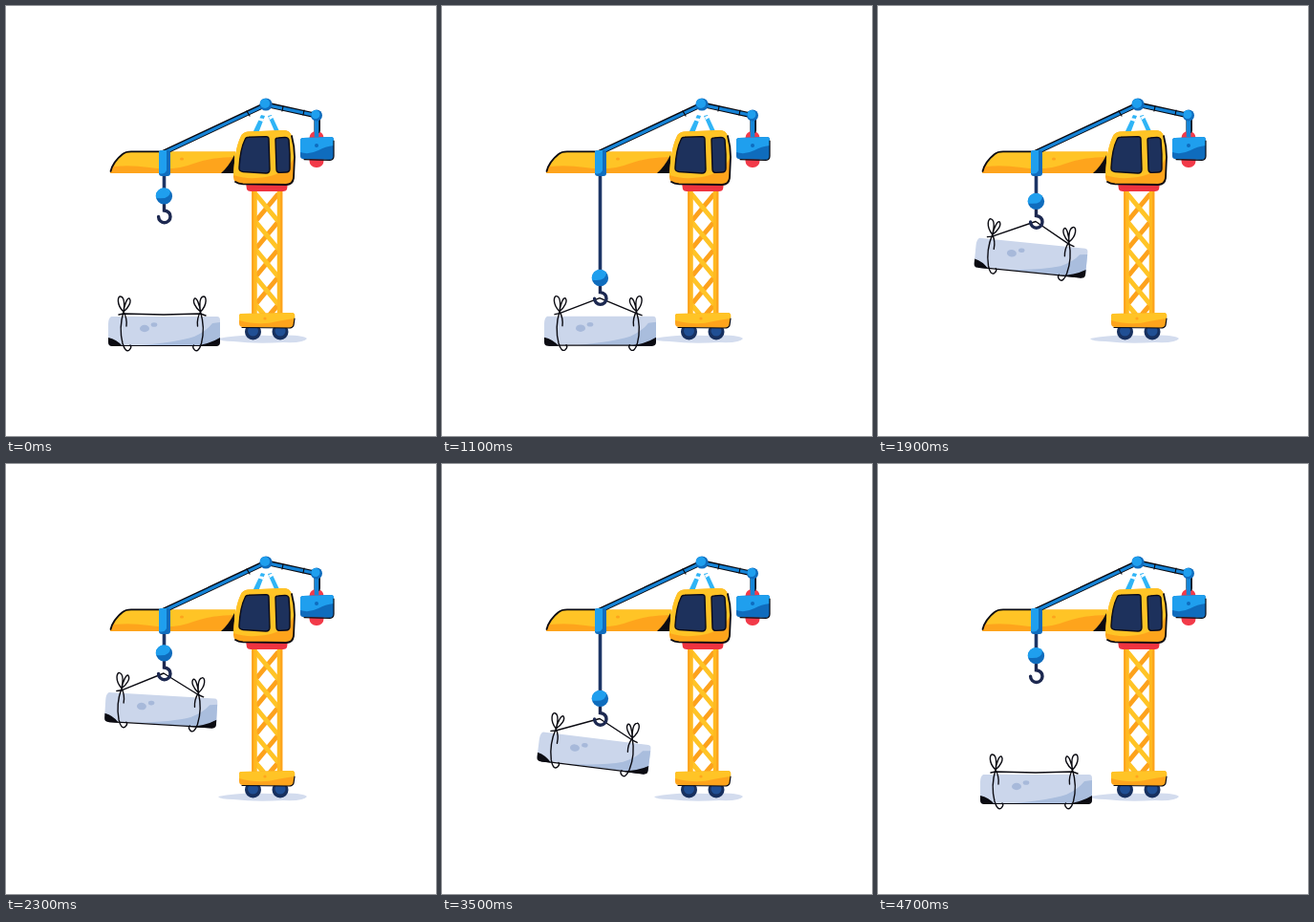
Animation, 450 px wide and 450 px high, one loop 4800 ms. Source, as an HTML page:

```html
<!DOCTYPE html>
<html lang="en">
<head>
<meta charset="utf-8">
<title>Tower crane</title>
<style>
html, body { margin: 0; width: 100%; height: 100%; overflow: hidden; background: #fff; }
svg { display: block; width: 100vw; height: 100vh; }
.line { fill: none; stroke: #0b0b12; stroke-linecap: round; stroke-linejoin: round; }
.sun { fill: #ffc426; }
.amber { fill: #fea41c; }
.sky { fill: #1f9fee; }
.sea { fill: #0f6cbd; }
.ink { fill: #0b0b12; }
</style>
</head>
<body>
<svg viewBox="0 0 450 450">
  <path fill="#d3dcee" d="M222 348Q246 343 276 345Q310 343 315 348Q312 353 290 352Q262 354 238 351Q224 351 222 348Z"/>

  <!-- tower -->
  <g fill="none" stroke-width="5">
    <path id="backBars" stroke="#fda21c"/>
    <path id="frontBars" stroke="#ffc426"/>
    <path stroke="#ffb920" stroke-width="5.5" d="M260 193V323M286.5 193V323"/>
    <path stroke="#fda21c" stroke-width="2" d="M258.2 194V322M288.3 194V322"/>
  </g>
  <path fill="#ef3340" d="M251 185H295L294 192Q293 194 290 194H256Q253 194 252 192Z"/>

  <!-- wheels and base -->
  <g id="wheels"></g>
  <path class="amber" d="M246 322L300 321Q303 322 302 326L301 334Q300 337 296 337L248 336Q244 336 244 332V325Q244 322 246 322Z"/>
  <path class="sun" d="M246 322L300 321Q303 322 302 327Q294 328 284 330Q266 335 244 329V325Q244 322 246 322Z"/>
  <path class="line" stroke-width="1.2" d="M247 336.5L296 337Q300 337 301 334L302 327"/>
  <circle class="amber" cx="271" cy="327" r="1.6"/>

  <!-- boom -->
  <path class="amber" d="M109 175Q112 163 122 155Q125 152.5 131 152.5H240V175Z"/>
  <path class="sun" d="M122 155Q125 152.5 131 152.5H240V158Q215 158 196 165Q176 173 150 169Q130 166 113 168Q116 160 122 155Z"/>
  <path class="ink" d="M225 175Q233 168 239 156V175Z"/>
  <path class="line" stroke-width="1.8" d="M109.5 173Q112 163 122 155Q125 152.3 131 152.3H160"/>
  <ellipse class="amber" cx="184" cy="160" rx="2" ry="1.5"/>

  <!-- cabin -->
  <path fill="#2fb4f6" d="M267 114L271 115L264.5 132H258.5ZM274 115L278 114L285.5 130L281 131Z"/>
  <path fill="#fff" d="M264 117L270 118L269 121L263 119ZM275 116L280 114L281 116L276 119Z"/>
  <path class="amber" d="M246 136Q248 132 253 131.5L291 130Q297 130 299 136Q302 147 302 158L301 180Q300 187 293 187L247 186Q238 186 238 179Q239 150 246 136Z"/>
  <path class="sun" d="M246 136Q248 132 253 131.5L291 130Q297 130 299 136Q301 144 302 157Q295 175 272 179Q252 182 238 177Q239 150 246 136Z"/>
  <path class="line" stroke-width="1.8" d="M240 184Q243 186 248 186.3L293 187Q300 187 301 180L302 158Q302 147 299 136"/>
  <g fill="#1d315c" stroke="#0b0b18" stroke-width="1.4" stroke-linejoin="round">
    <path d="M250 140Q251 137.3 254 137.3L272 136.6Q275 136.6 275 139L276 171Q276 175 272 175L248 173.5Q243.5 173 244 169Q245 150 250 140Z"/>
    <path d="M282 140Q282 138 285 138L292 137.4Q295 137.4 296 140Q297.5 155 297 170Q297 174 293 174L286 174.4Q283 174 283 171Z"/>
  </g>

  <!-- counterweight -->
  <rect x="317.5" y="131" width="15" height="38" rx="7" fill="#f23a49"/>
  <path class="line" stroke-width="6.5" d="M325.7 117V130"/>
  <path fill="none" stroke="#1585d8" stroke-width="4.6" d="M325 115V137"/>
  <path class="sea" d="M311 138L340 137Q343 137 343 140V157Q343 161 339 161L311 160Q308 160 308 157V141Q308 138 311 138Z"/>
  <path class="sky" d="M311 138L340 137Q343 137 343 140V146Q334 147 327 151Q317 156 308 153V141Q308 138 311 138Z"/>
  <path class="line" stroke-width="1.2" d="M312 160.6L339 161.4Q343 161 343 157V141"/>
  <circle class="sea" cx="325" cy="146" r="2"/>

  <!-- tie rods -->
  <path class="line" stroke-width="5.4" d="M164 153.8L272 103L326 115"/>
  <path fill="none" stroke="#1583d6" stroke-width="3.2" d="M164 154L272 103.4L325 114.6"/>
  <path class="line" stroke-width="1.2" d="M252 110L255 115M290 105L289 110M312 109L311 114"/>
  <g id="joints"></g>

  <!-- load -->
  <g id="load">
    <path fill="#cbd6eb" d="M110 325H221Q224 325 224 329V351Q224 355 220 355H111Q107 355 107 351V333Q107 327 110 325Z"/>
    <path fill="#a9bddd" d="M142 355Q178 352 197 346Q210 340 216 332L224 331V351Q224 355 220 355Z"/>
    <path class="ink" d="M107 347Q116 349 122 356H111Q107 356 107 352ZM195 356Q213 354 224 347V352Q224 356 220 356Z"/>
    <path class="line" stroke-width="1.2" d="M112 355.5H220"/>
    <ellipse cx="145" cy="337.5" rx="5" ry="3.7" fill="#a7b9da"/>
    <ellipse cx="155" cy="333.5" rx="3.3" ry="2.3" fill="#a7b9da"/>
    <path id="sling" class="line" stroke-width="1.4"/>
    <g id="ties" class="line" stroke-width="1.4"></g>
  </g>

  <!-- hoist -->
  <path id="rope" fill="none" stroke="#1c3566" stroke-width="3.6"/>
  <g id="hook">
    <path fill="none" stroke="#1c2850" stroke-width="3.4" stroke-linecap="round" d="M165.5 8V15Q172 16 172 21.5A6.2 6.2 0 0 1 159.6 21.5"/>
    <circle class="sea" cx="165.5" r="8.6"/>
    <path class="sky" d="M157 2A8.6 8.6 0 0 1 172 -5.6Q172 4 157 2Z"/>
  </g>
  <path class="sea" d="M160 153Q160 151 163 151H169Q172 151 172 154V175Q172 178 169 178H163Q160 178 160 175Z"/>
  <path class="sky" d="M160 153Q160 151 163 151H168V172Q166 177 160 175Z"/>
</svg>
<script>
const $ = id => document.getElementById(id);

const bars = [196.5, 225.5, 254.5, 283.5];
$('backBars').setAttribute('d', bars.map(y => `M285 ${y}L261 ${y + 29}`).join('') + 'M285 312.5L276 323');
$('frontBars').setAttribute('d', bars.map(y => `M261 ${y}L285 ${y + 29}`).join('') + 'M261 312.5L270 323');

$('wheels').innerHTML = [258.5, 287].map(x =>
  `<circle cx="${x}" cy="341" r="8.5" fill="#17305f"/><circle cx="${x}" cy="340" r="5.5" fill="#204f94"/>`).join('');

$('joints').innerHTML = [[272, 103, 6.6], [325, 114.5, 6]].map(([x, y, r]) =>
  `<circle class="sea" cx="${x}" cy="${y}" r="${r}"/><circle class="sky" cx="${x - 1}" cy="${y - 1}" r="${r - 1.5}"/>`).join('');

$('ties').innerHTML = [[123, 1], [203.5, -1]].map(([x, s]) =>
  `<path transform="translate(${x} 320) scale(${s} 1)" d="M0 0C-8 -8 -6 -17 -3 -16C1 -15 1 -7 0 0
   C1 -8 4 -15 6 -14C9 -11 5 -4 0 0C-4 13 -3 25 -1 33Q2 43 6 40Q9 37 7 35M0 0Q4 7 3 15"/>`).join('');

// [time, value] pairs with sine easing in between
const hoist = [[0, 199], [730, 285], [1060, 285], [2080, 198], [2960, 198], [3980, 285], [4200, 285], [4750, 199]];
const swing = [[1100, 0], [1700, 6], [3000, 0], [3650, 8], [3950, 7], [4200, 0]];
const slack = [[700, 1], [1050, 0], [4050, 0], [4250, 1]];

function at(keys, t) {
  const i = keys.findIndex(k => k[0] > t);
  if (i < 0) return keys[keys.length - 1][1];
  if (!i) return keys[0][1];
  const [t0, a] = keys[i - 1], [t1, b] = keys[i];
  return a + (b - a) * (1 - Math.cos(Math.PI * (t - t0) / (t1 - t0))) / 2;
}

function draw(now) {
  const t = Math.floor(now % 4800 / 100) * 100;
  const y = at(hoist, t), tilt = at(swing, t), loose = at(slack, t);
  const lift = t > 1050 && t < 4050 ? (285 - y) * 0.95 : 0;
  const grip = y + 21, drift = tilt * 0.3;
  const peak = (grip + lift) * (1 - loose) + 323 * loose;

  $('rope').setAttribute('d', `M165.5 176V${y}`);
  $('hook').setAttribute('transform', `translate(0 ${y})`);
  $('load').setAttribute('transform', `rotate(${tilt} 165 ${grip}) translate(${-drift} ${-lift})`);
  $('sling').setAttribute('d', `M118 323L123 322L${165 + drift} ${peak}L203.5 322L209 324`);
  requestAnimationFrame(draw);
}
requestAnimationFrame(draw);
</script>
</body>
</html>
```
